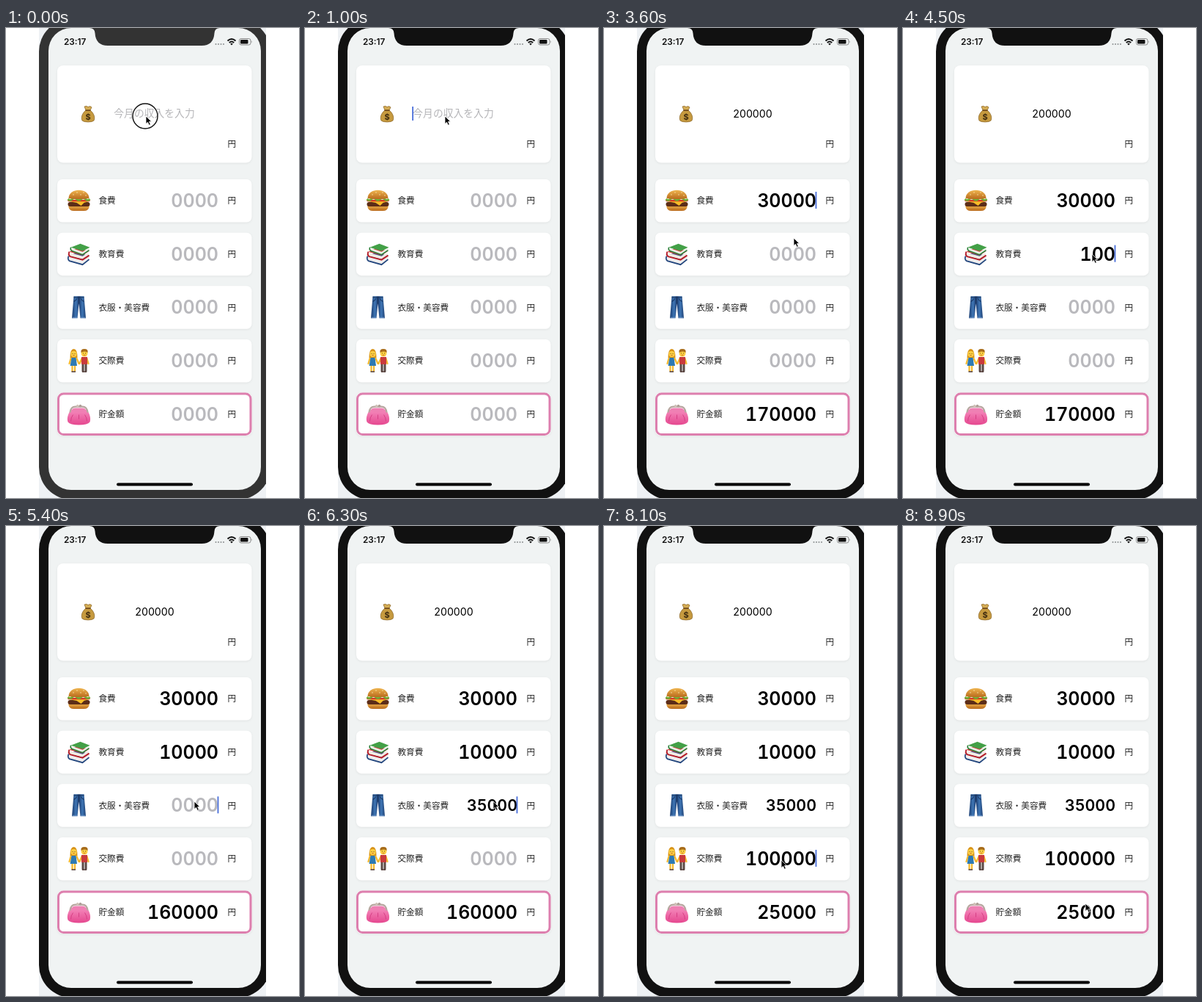
An HTML page for the animation above (9000 ms loop, 400 px wide and 640 px high).

```html
<!DOCTYPE html>
<html lang="ja">
<head>
<meta charset="utf-8">
<style>
  html, body { margin: 0; width: 100%; height: 100%; overflow: hidden; background: #fff; }
  svg { display: block; width: 400px; height: 640px; }
  text { font-family: "Noto Sans CJK JP", "Noto Sans CJK", sans-serif; font-size: 11.6px; fill: #222; }
  .num { font-family: Inter, Roboto, sans-serif; font-feature-settings: "tnum"; font-weight: 600; font-size: 25px; text-anchor: end; fill: #000; }
  .empty { fill: #b9b9bd; }
  .card { fill: #fff; filter: drop-shadow(0 1px 1.5px #0001); }
  #income { font-family: Inter, Roboto, sans-serif; font-size: 14.2px; text-anchor: middle; fill: #000; }
  #hint { font-size: 13.8px; font-weight: 300; text-anchor: middle; fill: #b5b5b8; }
</style>
</head>
<body>
<svg viewBox="0 0 400 640">
  <defs>
    <clipPath id="crop"><rect x="45" width="310" height="640"/></clipPath>
    <linearGradient id="bun" x2="0" y2="1"><stop stop-color="#efb54f"/><stop offset="1" stop-color="#b96a1c"/></linearGradient>
    <linearGradient id="pink" x2="0" y2="1"><stop stop-color="#f58bbd"/><stop offset="1" stop-color="#e5478f"/></linearGradient>
    <linearGradient id="denim"><stop stop-color="#1d3f72"/><stop offset=".3" stop-color="#3f76b5"/><stop offset=".5" stop-color="#1c3c70"/><stop offset=".75" stop-color="#3f76b5"/><stop offset="1" stop-color="#1d3f72"/></linearGradient>
  </defs>

  <g clip-path="url(#crop)">
    <rect x="45" width="310" height="640" fill="#eef1f4"/>
    <rect id="bezel" x="45" y="-12" width="316" height="654" rx="44"/>
    <rect x="58" width="290" height="629" rx="31" fill="#f0f3f3"/>
    <path id="notch" d="M114 -1V0Q121 0 121.500 7Q122.500 24 139 24H267Q283.500 24 284.500 7Q285 0 292 0V-1Z"/>
  </g>

  <text x="79" y="23" style="font:600 11.8px Inter,Roboto,sans-serif;fill:#111">23:17</text>
  <path d="M286.500 22H298" stroke="#8b8f90" stroke-width="2" stroke-linecap="round" stroke-dasharray="0 3.500"/>
  <g fill="none" stroke="#111" stroke-width="2">
    <path d="M302.500 17.500Q308 12.500 313.500 17.500M304.800 20Q308 17 311.200 20"/>
    <path d="M308 23.500L306.200 21.600Q308 20 309.800 21.600Z" fill="#111" stroke="none"/>
  </g>
  <rect x="318.500" y="14.500" width="15.500" height="8.500" rx="2.500" fill="none" stroke="#888"/>
  <rect x="320" y="16" width="10.500" height="5.500" rx="1.300" fill="#111"/>
  <path d="M335.300 17.500q1.500 1.300 0 2.700z" fill="#888"/>
  <rect x="151" y="619.500" width="104" height="4" rx="2"/>

  <rect class="card" x="70" y="51" width="265.500" height="132.500" rx="8"/>
  <text x="302.500" y="161.500">円</text>
  <g transform="translate(112 117)">
    <path d="M-3-5C-8-1-10 5-8 9Q-6 11 0 11T8 9C10 5 8-1 3-5Z" fill="#c69a3f" stroke="#876021" stroke-width=".7"/>
    <path d="M-3-5L-5-10Q-2-11.500 0-9.500Q3-11.500 5-9L3-5Z" fill="#d5ad55" stroke="#876021" stroke-width=".7"/>
    <path d="M-3.500-4.800H3.500" stroke="#70491b" stroke-width="1.600"/>
    <text y="8" text-anchor="middle" style="font:700 11px Inter,sans-serif;fill:#3f2c10">$</text>
  </g>
  <text id="hint" x="202.500" y="121">今月の収入を入力</text>
  <text id="income" x="203" y="121.500"></text>

  <g id="rows"></g>

  <g id="icons">
    <g>
      <path d="M-14 6H14V9Q13 14 7 14H-7Q-13 14-14 9Z" fill="url(#bun)"/>
      <rect x="-15" y="2" width="30" height="6" rx="3" fill="#5c2d18"/>
      <path d="M-14 1H14L7 3L3 7L-3 3Z" fill="#f8bd27"/>
      <path d="M-14 0H14" stroke="#d63a27" stroke-width="2.500" stroke-linecap="round"/>
      <path d="M-15-2Q-12 1-9-2T-3-2T3-2T9-2T15-2" fill="none" stroke="#6fae33" stroke-width="2.500"/>
      <path d="M-14-3C-14-18 14-18 14-3Q0-1-14-3Z" fill="url(#bun)"/>
      <path d="M-8-8h1M-3-11h1M2-8h1M6-11h1M9-7h1" stroke="#fbe6b0" stroke-width="1.300"/>
    </g>
    <g>
      <path d="M-14 4L4 9L14 2V7L5 14L-13 9Z" fill="#eee"/>
      <path d="M-14 3L-4-2L14 2L4 8Z" fill="#2d5797"/>
      <path d="M-14 3Q-16 7-13 9.500L5 14.500L14 7.500" fill="none" stroke="#24477e" stroke-width="1.800"/>
      <path d="M-13-2L5 3L13-2V2L5 7L-12 3Z" fill="#f1ece4"/>
      <path d="M-13-3L-3-8L14-4L5 2Z" fill="#d7363a"/>
      <path d="M-13-3Q-15 1-12 3.500L5 8L14 2" fill="none" stroke="#b61f2a" stroke-width="2"/>
      <path d="M-10-8L5-3L14-8V-5L5 1L-9-4Z" fill="#e9efe5"/>
      <path d="M-11-9L2-14L15-9L5-4Z" fill="#43a047"/>
      <path d="M-11-9Q-12-5-9-4L5 1L14-5" fill="none" stroke="#287f36" stroke-width="1.600"/>
    </g>
    <g>
      <path d="M-7-15H7L9.500 15H2L0-5L-2 15H-9.500Z" fill="url(#denim)"/>
      <path d="M-7-13.500H7M0-14V-5M-7-8Q-4-8-3-12M7-8Q4-8 3-12" fill="none" stroke="#173159"/>
      <path d="M-9 14H-2.500M2.500 14H9" stroke="#7198c8"/>
    </g>
    <g stroke-linecap="round">
      <path d="M-9 6V14M-5.500 6V14M-11-3L-13 4M-3-3L0 4M4-3L1 4M11-3L13 4" stroke="#f4b92f" stroke-width="2.300"/>
      <path d="M5.500 4V14M9.500 4V14" stroke="#5b4a45" stroke-width="3"/>
      <path d="M-10-4H-4L-2.500 7H-12Z" fill="#2e7ab3"/>
      <path d="M3.500-5H11.500V5H3.500Z" fill="#c93a3c"/>
      <path d="M-12-4Q-12-16-7-16T-2-4Z" fill="#d79419"/>
      <circle cx="-7" cy="-9" r="4" fill="#ffd044"/>
      <circle cx="7.500" cy="-10" r="4.500" fill="#ffd044"/>
      <path d="M3-11Q2-16 7.500-16T12-11Q8-14 3-11Z" fill="#a76c1a"/>
      <path d="M-8.500-9.500h.1M-5.500-9.500h.1M6-10h.1M9-10h.1" stroke="#553b14"/>
      <path d="M-8-7.200h2M6.500-7.500h2" stroke="#b95c26" stroke-width=".8"/>
      <path d="M-9.500 15H-5M5 15H10" stroke="#4c3531" stroke-width="1.500"/>
    </g>
    <g>
      <path d="M-11-6C-14-1-17 5-15 11Q-12 15 0 15T15 11C17 5 14-1 11-6Q0-2-11-6Z" fill="url(#pink)"/>
      <path d="M-8 1Q-11 5-11 10M8 1Q11 5 11 10M0 1V7" fill="none" stroke="#d43c82" stroke-width=".9"/>
      <path d="M-12-2Q-11-10-5-10H5Q11-10 12-2" fill="none" stroke="#b7a7a0" stroke-width="2.200"/>
      <path d="M-10-4Q-9-8-5-8H5Q9-8 10-4Q0 0-10-4Z" fill="#ef80b3"/>
      <circle cx="-1.800" cy="-11" r="1.800" fill="#d1c4ba"/><circle cx="2" cy="-11" r="1.800" fill="#afa098"/>
    </g>
  </g>

  <rect id="caret" width="1.700" fill="#3f66d8"/>
  <g id="pointer">
    <circle id="ring" cx="-1" r="17" fill="none" stroke="#111" stroke-width="1.400"/>
    <path d="M0 0V10.500L2.500 8.300L4.300 12.300L6.300 11.400L4.500 7.600H7.800Z" fill="#000" stroke="#fff" stroke-width=".8"/>
  </g>
</svg>
<script>
const LOOP = 9000;
const $ = id => document.getElementById(id);
const rowTop = i => 206 + i * 72.65;
const labels = ['食費', '教育費', '衣服・美容費', '交際費', '貯金額'];

// Each field is clicked, typed into and then committed to the balance.
const fields = [
  { text: '200000', click: 0, type: 1100, step: 140, commit: 2000 },
  { text: '30000', click: 2400, type: 2600, step: 140, commit: 3400 },
  { text: '10000', click: 3900, type: 4100, step: 140, commit: 4900 },
  { text: '35000', click: 5200, type: 5600, step: 140, commit: 6400 },
  { text: '100000', click: 6800, type: 7200, step: 110, commit: 8000 }
];

const path = [
  [0, 191, 120], [1900, 191, 120], [2200, 263, 247], [2400, 262, 243], [3400, 262, 243],
  [3600, 259, 286], [3900, 258, 308], [4900, 258, 308], [5200, 257, 375], [6400, 257, 375],
  [6800, 242, 455], [8100, 242, 455], [8500, 249, 514], [LOOP, 249, 514]
];

$('rows').innerHTML = labels.map((label, i) => {
  const y = rowTop(i), mid = y + 29;
  const border = i === 4 ? '<rect x="71.500" y="498" width="262.500" height="55.500" rx="7" fill="none" stroke="#dd7fae" stroke-width="3"/>' : '';
  $('icons').children[i].setAttribute('transform', `translate(99.500 ${mid})`);
  return `<rect class="card" x="70" y="${y}" width="265.500" height="58.500" rx="7"/>${border}
    <text x="126.500" y="${mid + 4.3}">${label}</text>
    <text x="302.500" y="${mid + 4.3}">円</text>
    <text class="num" x="290" id="n${i}"></text>`;
}).join('');

function typed(f, t) {
  return t < f.type ? '' : f.text.slice(0, Math.floor((t - f.type) / f.step) + 1);
}

function setNumber(i, value) {
  const el = $('n' + i);
  const size = i === 2 && value.length > 4 ? 21.4 : 25;
  el.textContent = value || '0000';
  el.classList.toggle('empty', !value);
  el.style.fontSize = size + 'px';
  el.setAttribute('y', rowTop(i) + 29 + size * 0.364);
}

function pointerAt(t) {
  const k = path.findIndex(p => p[0] > t);
  const [t0, x0, y0] = path[k - 1], [t1, x1, y1] = path[k];
  const u = (t - t0) / (t1 - t0), e = u * u * (3 - 2 * u);
  return [x0 + (x1 - x0) * e, y0 + (y1 - y0) * e];
}

function setCaret(t) {
  const active = fields.findLastIndex(f => t >= f.click);
  const hidden = t < 200 || t >= 8300 || (active === 1 && t >= 3800);
  const x = active ? 288.6 : t < fields[0].type ? 146.3 : 203 + typed(fields[0], t).length * 4.4;
  const caret = $('caret');
  caret.setAttribute('x', x);
  caret.setAttribute('y', active ? rowTop(active - 1) + 17 : 107);
  caret.setAttribute('height', active ? 23 : 19);
  caret.style.display = hidden ? 'none' : '';
}

function draw(now) {
  const t = Math.floor(now % LOOP / 100) * 100;
  const shell = t < 200 ? '#333' : '#111';
  $('bezel').style.fill = $('notch').style.fill = shell;

  const income = typed(fields[0], t);
  $('income').textContent = income;
  $('hint').style.display = income ? 'none' : '';
  for (let i = 0; i < 4; i++) setNumber(i, typed(fields[i + 1], t));

  const balance = fields.reduce((sum, f, i) => sum + (t >= f.commit ? (i ? -f.text : +f.text) : 0), 0);
  setNumber(4, balance ? String(balance) : '');

  setCaret(t);
  $('pointer').setAttribute('transform', `translate(${pointerAt(t)})`);
  $('ring').style.display = fields.some(f => t >= f.click && t < f.click + 200) ? '' : 'none';
  requestAnimationFrame(draw);
}
requestAnimationFrame(draw);
</script>
</body>
</html>
```
